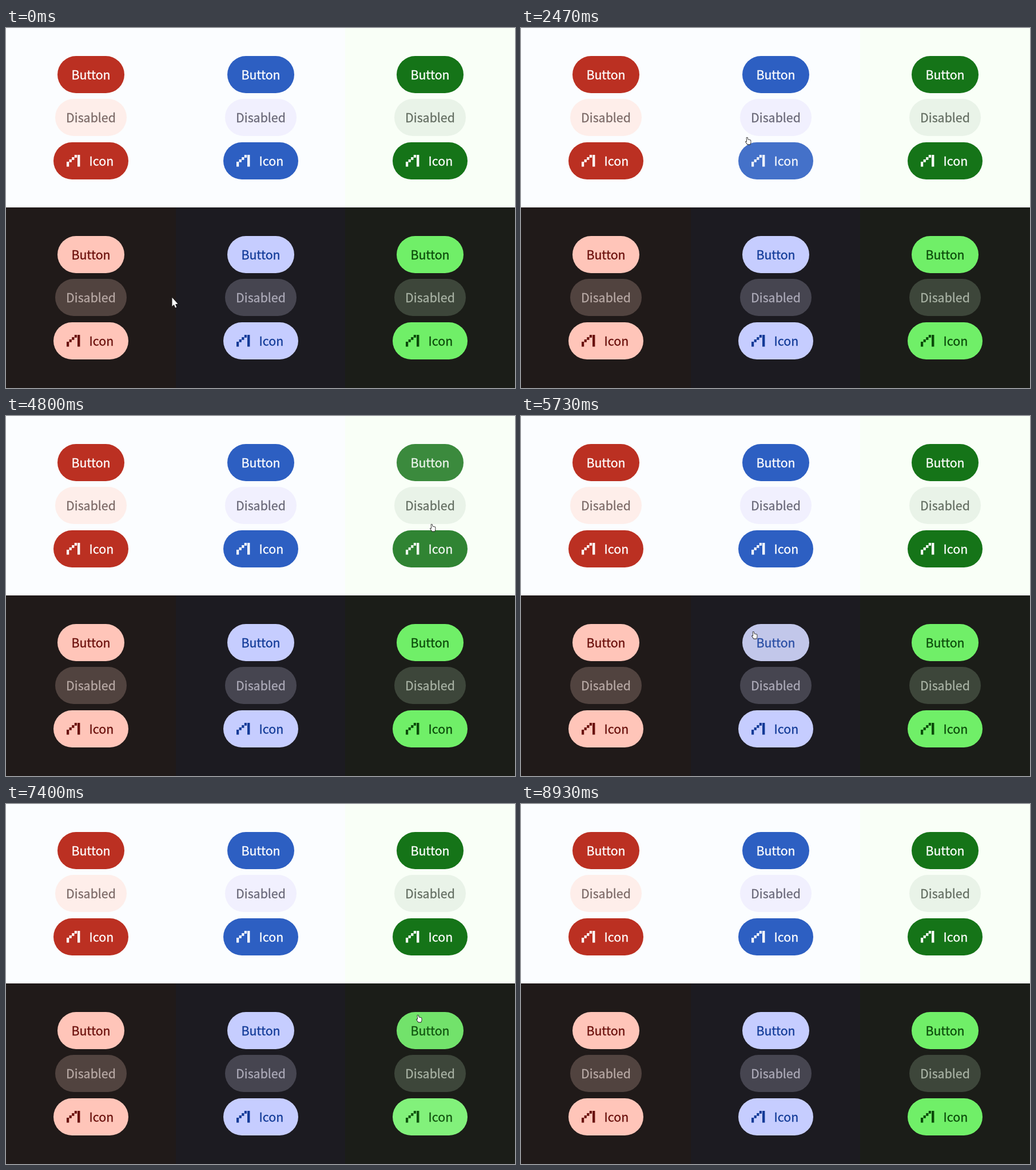
An HTML page with a canvas for the animation above (9540 ms loop, 890 by 630 pixels).

```html
<!DOCTYPE html>
<html lang="en">
<head>
<meta charset="utf-8">
<title>Button themes</title>
<style>
html, body { margin: 0; width: 100%; height: 100%; overflow: hidden; background: #fbfdff; }
canvas { display: block; }
</style>
</head>
<body>
<canvas id="stage" width="890" height="630"></canvas>
<script>
const ctx = document.getElementById('stage').getContext('2d');
const LOOP = 9540, STEP = 200 / 3, FLASH = 600, GLIDE = 330;
const COL = 890 / 3, ROW = 315;
const TOP = 49, PITCH = 75.5, HEIGHT = 65, CENTER = 148.5;
const FONT = '21.33px "Noto Sans CJK SC", "Noto Sans CJK JP", "Noto Sans CJK", "Noto Sans", sans-serif';

// background, fill, ink, disabled fill, disabled ink
const themes = [
  ['#fbfdff', '#bb3022', '#ffffff', '#feeeea', '#7b6a67'],
  ['#fbfdff', '#2d5fc2', '#ffffff', '#f1f0fe', '#6a6978'],
  ['#f9fff7', '#157418', '#ffffff', '#e9f3e8', '#646e62'],
  ['#201a19', '#ffc5b9', '#690e0a', '#51433f', '#b9aaa6'],
  ['#1c1b21', '#c6cdff', '#113a97', '#464550', '#adabb9'],
  ['#1b1d18', '#70ef68', '#0b4a0a', '#3d463a', '#a9b3a5']
];
const labels = ['Button', 'Disabled', 'Icon'];
const widths = [117, 125, 131];

// Cursor stops: arrival time, x, y, and whether it clicks there
const stops = [
  [0, 290, 471], [200, 255, 545], [665, 117, 52], [865, 117, 52, true],
  [1530, 213, 187], [1865, 174, 168], [2330, 416, 200], [2465, 392, 191, true],
  [3130, 436, 147], [3865, 762, 162], [4465, 728, 62, true], [4795, 741, 189, true],
  [5200, 578, 397], [5600, 403, 377, true], [6070, 530, 612], [6330, 430, 545, true],
  [7000, 720, 540, true], [7395, 717, 369, true], [7830, 404, 378, true],
  [8300, 112, 380, true], [8700, 66, 640]
];

function locate(x, y) {
  const col = Math.floor(x / COL), row = Math.floor(y / ROW);
  const kind = Math.floor((y - row * ROW + 12 - TOP + 5) / PITCH);
  return { col, row, kind, theme: row * 3 + col };
}

const clicks = stops.filter(s => s[3]).map(([time, x, y]) => ({ time, ...locate(x, y) }));

// The cursor rests until GLIDE ms before the next arrival.
function cursorAt(t) {
  const next = stops.findIndex(s => s[0] > t);
  if (next < 0) return stops[stops.length - 1].slice(1, 3);
  const [t0, x0, y0] = stops[next - 1], [t1, x1, y1] = stops[next];
  const start = Math.max(t0, t1 - GLIDE);
  const k = Math.max(0, (t - start) / (t1 - start));
  return [Math.round(x0 + (x1 - x0) * k), Math.round(y0 + (y1 - y0) * k)];
}

function flashAt(t, theme, kind) {
  const click = clicks.find(c => c.theme === theme && c.kind === kind && t >= c.time && t < c.time + FLASH);
  if (!click) return null;
  const age = t - click.time;
  return {
    alpha: Math.min(0.11 + age * 0.0015, 0.37 * (1 - age / FLASH)),
    tone: theme < 3 ? 252 : Math.min(255, 130 + age * 0.4)
  };
}

const rgb = hex => [1, 3, 5].map(p => parseInt(hex.slice(p, p + 2), 16));

function mix(hex, to, k) {
  return `rgb(${rgb(hex).map((v, i) => Math.round(v + (to[i] - v) * k))})`;
}

function drawGlyph() {
  for (let i = 0; i < 4; i++) ctx.fillRect(106 + i * 4.6, 234 - i * 4, 4.2, i ? 4.8 : 8.6);
  ctx.fillRect(125, 222, 4.4, 20.6);
}

function drawButton(t, theme, kind) {
  const [, fill, text, offFill, offText] = themes[theme];
  const off = kind === 1, icon = kind === 2, flash = flashAt(t, theme, kind);
  const w = widths[kind], x = Math.floor(CENTER - w / 2 + 0.5), y = Math.floor(TOP + kind * PITCH);
  let back = off ? offFill : fill, ink = off ? offText : text;
  if (flash) {
    back = mix(fill, Array(3).fill(flash.tone), flash.alpha);
    ink = mix(text, rgb(fill), flash.alpha * 0.45);
  }
  ctx.fillStyle = back;
  ctx.beginPath();
  ctx.roundRect(x, y, w, HEIGHT, HEIGHT / 2);
  ctx.fill();

  ctx.fillStyle = ctx.strokeStyle = ink;
  ctx.lineWidth = 0.3;
  ctx.textAlign = icon ? 'left' : 'center';
  const tx = icon ? 145.6 : CENTER, ty = y + 41;
  ctx.fillText(labels[kind], tx, ty);
  ctx.strokeText(labels[kind], tx, ty);
  if (icon) drawGlyph();
}

// The pointing hand also covers the narrow gaps between buttons.
function overButton(x, y) {
  const { col, row, kind } = locate(x, y);
  const dx = Math.abs(x + 5 - col * COL - CENTER);
  return y - row * ROW > TOP - 10 && kind < 3 && dx < widths[kind] / 2;
}

function shape(points) {
  ctx.beginPath();
  for (let i = 0; i < points.length; i += 2) ctx.lineTo(points[i], points[i + 1]);
  ctx.closePath();
  ctx.stroke();
  ctx.fill();
}

function drawCursor(x, y) {
  ctx.save();
  ctx.translate(x, y);
  ctx.fillStyle = '#fff';
  ctx.strokeStyle = '#111';
  ctx.lineJoin = 'round';
  if (overButton(x, y)) {
    ctx.lineWidth = 1.6;
    shape([2.5, 1, 4, 1, 4.6, 4.3, 9.4, 5.6, 9.6, 9.6, 8.6, 12.6, 4, 12.6, 1, 8, 3, 8]);
  } else {
    ctx.lineWidth = 1;
    shape([0.5, 0.8, 0.5, 16, 3.8, 13, 6, 18.4, 8.2, 17.4, 6, 12.2, 10.4, 11.8]);
  }
  ctx.restore();
}

function draw(t) {
  ctx.font = FONT;
  themes.forEach(([bg], i) => {
    const x = Math.round(i % 3 * COL), row = Math.floor(i / 3);
    ctx.fillStyle = bg;
    ctx.fillRect(x, row * (ROW - 1), COL + 1, ROW + 1);
  });
  themes.forEach((theme, i) => {
    ctx.save();
    ctx.translate(Math.round(i % 3 * COL), Math.floor(i / 3) * ROW);
    labels.forEach((label, kind) => drawButton(t, i, kind));
    ctx.restore();
  });
  drawCursor(...cursorAt(t));
}

function tick() {
  const t = performance.now() % LOOP;
  draw(Math.floor((t + 4) / STEP) * STEP);
  requestAnimationFrame(tick);
}
tick();
</script>
</body>
</html>
```
